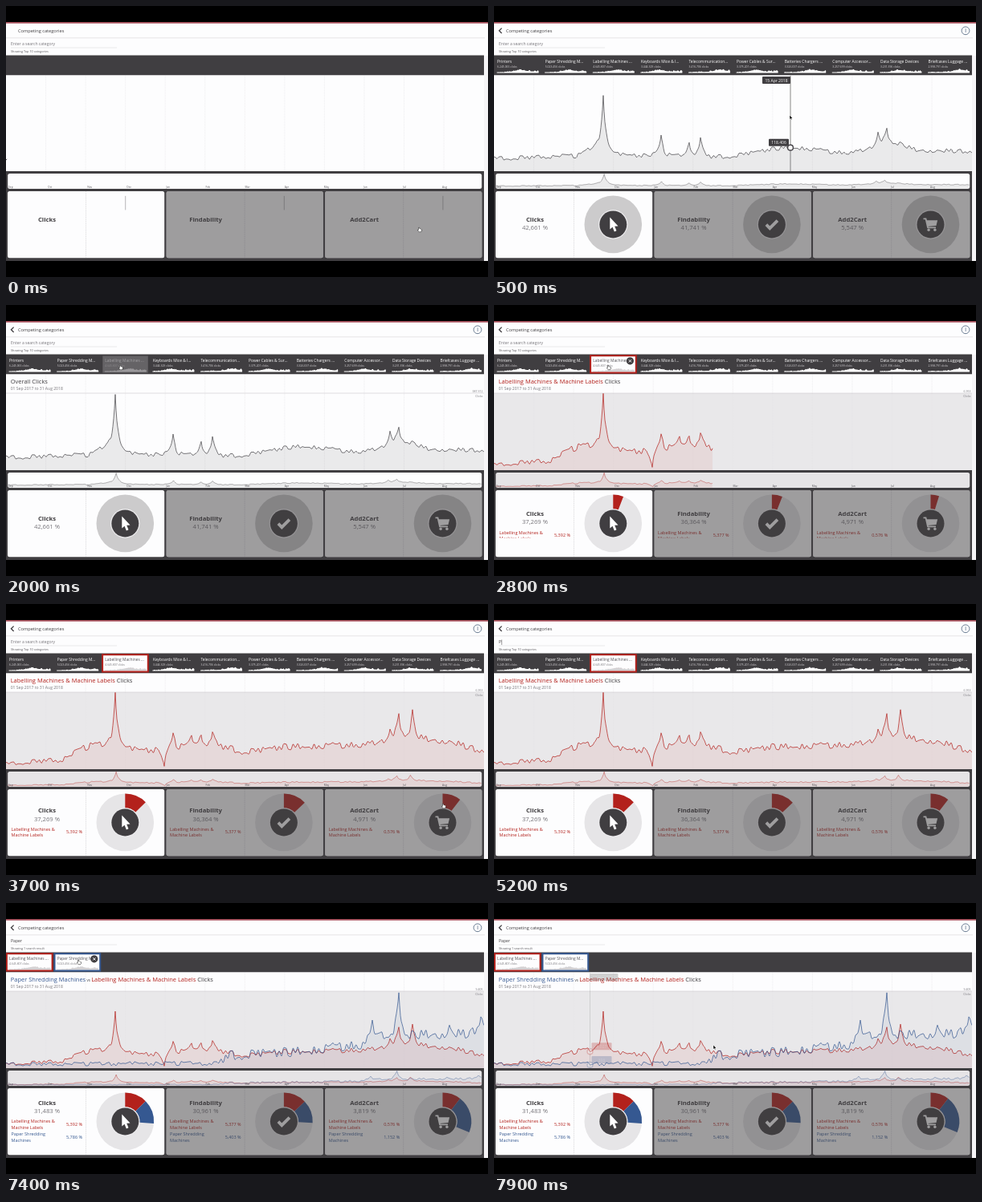
Animation of 600x338 px, one loop 8 s. Source, as an HTML page with a canvas:

```html
<!DOCTYPE html>
<html lang="en">
<head>
<meta charset="utf-8">
<title>Competing categories</title>
<style>
html, body { margin: 0; width: 100%; height: 100%; overflow: hidden; background: #000; }
canvas { display: block; width: 600px; height: 338px; }
</style>
</head>
<body>
<canvas id="stage"></canvas>
<script>
const LOOP = 8000, BASE = 206, TOP = 96, W = 595;
const DARK = '#403e41', WHITE = '#fdfdfe', RED = '#b3211c', BLUE = '#355891', GREY = '#77757a';
const canvas = document.getElementById('stage');
const c = canvas.getContext('2d');
const ratio = window.devicePixelRatio || 1;
canvas.width = 600 * ratio;
canvas.height = 338 * ratio;

const clamp = v => Math.max(0, Math.min(1, v));
const lerp = (a, b, k) => a + (b - a) * k;
const smooth = k => (1 - Math.cos(k * Math.PI)) / 2;
const ease = p => p < .5 ? 4 * p ** 3 : 1 - 4 * (1 - p) ** 3;
const grow = (t, start) => ease(clamp((t - start) / 445));

// Each series: trend points and spikes (x, height), plus rough noise
const overall = { total: 387312, color: '#454347', fill: 'rgba(64,62,65,.11)', rough: 2.6,
  trend: [0,16, 100,19, 128,30, 160,20, 280,18, 369,29.3484, 440,23, 500,35, 530,26, 596,25],
  spikes: [136,66, 208,24, 243,18, 257,24, 478,18, 489,18] };
const labels = { total: 6953, color: RED, fill: 'rgba(190,50,40,.09)', rough: 4,
  trend: [0,7, 60,11, 112,30, 135,30, 160,24, 260,29, 300,22, 350,28, 440,30, 500,40, 540,36, 596,24],
  spikes: [136,66, 197,-23, 208,17, 231,12, 243,15, 257,18, 478,14, 489,28, 506,32] };
const paper = { total: 9405, color: BLUE, fill: 'rgba(60,85,140,.07)', rough: 6,
  trend: [0,5, 260,6, 280,16, 345,20, 440,28, 465,42, 530,42, 575,43, 596,54],
  spikes: [456,16, 489,52, 552,10, 591,14] };

const jitter = i => Math.sin(i * i * 1.37 + i * 2.1);
function noise(x) {
  const u = (x - 369) / 2.9, i = Math.floor(u);
  return lerp(jitter(i), jitter(i + 1), smooth(u - i));
}
function height({ trend, spikes, rough }, x) {
  let i = 0;
  while (i < trend.length - 4 && trend[i + 2] < x) i += 2;
  let v = lerp(trend[i + 1], trend[i + 3], smooth(clamp((x - trend[i]) / (trend[i + 2] - trend[i]))));
  for (let s = 0; s < spikes.length; s += 2) v += spikes[s + 1] * Math.exp(-Math.abs(x - spikes[s]) / 3.2);
  return Math.max(0, v + noise(x) * rough * clamp(v / 14) * clamp((TOP - v) / 30));
}

function text(s, x, y, size, color = DARK, align = 'left', weight = 400) {
  c.font = `${weight} ${size}px "Open Sans", "Noto Sans", sans-serif`;
  c.fillStyle = color;
  c.textAlign = align;
  c.fillText(s, x, y);
  return x + c.measureText(s).width;
}
function box(x, y, w, h, color, r = 0) {
  c.fillStyle = color;
  c.beginPath();
  c.roundRect(x, y, w, h, r);
  c.fill();
}
function paint(color, width) {
  if (width) { c.strokeStyle = color; c.lineWidth = width; c.stroke(); }
  else { c.fillStyle = color; c.fill(); }
}
function path(points, color, width, close) {
  c.beginPath();
  for (let i = 0; i < points.length; i += 2) c.lineTo(points[i], points[i + 1]);
  if (close) c.closePath();
  paint(color, width);
}
function disc(x, y, r, color, width) {
  c.beginPath();
  c.arc(x, y, r, 0, 7);
  paint(color, width);
}
function dashed(points, dash, color) {
  c.setLineDash(dash);
  path(points, color, .6);
  c.setLineDash([]);
}

// Pointer moves: start, end, x, y
const moves = [[100,480,369,139], [600,900,222,76], [1200,1600,88,75], [1600,1950,143,78],
  [3500,3700,545,252], [3900,4400,60,47], [6250,6650,91,74], [7500,7850,274,180]];
function pointer(t) {
  let x = 515, y = 279;
  for (const [start, end, toX, toY] of moves) {
    const k = clamp((t - start) / (end - start));
    x = lerp(x, toX, k);
    y = lerp(y, toY, k);
  }
  return { x, y, inChart: y > 87 && y < BASE };
}
function drawPointer(t, p) {
  if (t > 4650 && t < 6250) return;
  const shape = p.inChart
    ? [-.8,-2.5, -.8,2, .3,1.1, 1,2.8, 1.7,2.4, 1,.9, 2.3,.7]
    : [-1.3,-2.6, -.4,-2.6, -.3,-.9, 2.2,-.4, 2.2,1, 1.6,2.6, -.9,2.6, -2.4,.4, -1.3,.6];
  c.save();
  c.translate(p.x, p.y);
  path(shape, p.inChart ? '#fff' : '#222', 1, true);
  path(shape, p.inChart ? '#111' : '#fff');
  c.restore();
}

const tiles = [['Printers', '6.245.065'], ['Paper Shredding M...', '5.023.456'], ['Labelling Machines ...', '4.645.807'],
  ['Keyboards Mice & I...', '3.444.329'], ['Telecommunication...', '3.416.706'], ['Power Cables & Sur...', '3.375.201'],
  ['Batteries Chargers ...', '3.326.037'], ['Computer Accessor...', '3.257.699'],
  ['Data Storage Devices', '3.231.396'], ['Briefcases Luggage ...', '2.998.791']];

function drawTile(n, slot, color, p) {
  const x = 1.6 + slot * 59.6;
  const hover = p.y > 62 && p.y < 86 && p.x > x && p.x < x + 57;
  const [ink, faint, sparkInk] = color ? ['#555358', GREY, '#d4d2d4']
    : hover ? ['#a3a1a4', '#8d8b8e', '#9b999c'] : ['#fff', '#d8d6d9', '#fff'];
  if (color || hover) box(x - .5, 63.5, 56.5, 21, color ? WHITE : '#656366');
  text(tiles[n][0], x + 2.5, 70.8, 4.9, ink);
  text(tiles[n][1] + ' clicks', x + 2.5, 76.6, 3.4, faint);
  const spark = [x + 2, 83.6];
  for (let i = 0; i <= 52; i++) {
    const swell = 2.2 * Math.exp(-(((i - 32 - 10 * jitter(n + 1)) / 9) ** 2));
    spark.push(x + 2 + i, 82.6 - i * .02 - swell - Math.max(0, jitter(i + n * 60)) * (.4 + i * .025));
  }
  path([...spark, x + 54, 83.6], sparkInk);
  if (!color) return;
  c.strokeStyle = color;
  c.lineWidth = 2;
  c.strokeRect(x - .7, 63.2, 56.7, 21.3);
  if (hover) {
    disc(x + 48.6, 69.8, 4.6, DARK);
    for (const d of [-1.6, 1.6]) path([x + 48.6 - d, 68.2, x + 48.6 + d, 71.4], '#fff', 1);
  }
}

function drawSeries(series, k, scale) {
  const end = Math.floor(W * k);
  const draw = (x0, base, sx, sy, width) => {
    const pts = [];
    for (let x = 0; x <= end; x++) pts.push(x0 + x * sx, base - height(series, x) * scale * sy);
    path([x0, base, ...pts, x0 + end * sx, base], series.fill);
    path(pts, series.color, width);
  };
  c.save();
  c.globalAlpha = .9;
  draw(0, BASE, 1, 1, .8);
  draw(2.5, 227.5, .99, .19, .45);
  c.restore();
}

function drawHover(x, alpha, shown, scales) {
  const label = (s, y, w, gap, color) => {
    const left = x > 300 ? x - w - gap : x + gap;
    box(left, y, w, 9, color, 1);
    text(s, left + w / 2, y + 6.6, 5, '#fff', 'center');
  };
  c.save();
  c.globalAlpha = alpha;
  path([x, 87, x, BASE], '#555', .7);
  const day = new Date(Date.UTC(2017, 8, 1 + Math.floor(x / W * 365)));
  const month = day.toLocaleString('en', { month: 'short', timeZone: 'UTC' });
  label(`${day.getUTCDate()} ${month} ${day.getUTCFullYear()}`, 88, 35, 0, DARK);
  shown.forEach((series, i) => {
    const v = height(series, x), y = BASE - v * scales[i];
    const value = Math.round(v / TOP * series.total).toLocaleString('de-DE');
    label(value, y - 11, 25, 2, series === overall ? DARK : series.color);
    disc(x, y, 3.4, WHITE);
    disc(x, y, 3.4, series.color, 1.4);
  });
  c.restore();
}

const cards = [
  { name: 'Clicks', all: 42661, parts: [5392, 5786] },
  { name: 'Findability', all: 41741, parts: [5377, 5403] },
  { name: 'Add2Cart', all: 5547, parts: [576, 1152] }];
const lines = [['Labelling Machines &', 'Machine Labels'], ['Paper Shredding', 'Machines']];
const percent = n => `${Math.floor(n / 1000)},${String(n % 1000).padStart(3, '0')} %`;

const icons = [
  () => path([-4,-9, -4,6, -.8,3.3, 1.6,9, 4.2,7.9, 1.9,2.4, 6.2,2.2], '#fff'),
  () => path([-7,.3, -2.6,4.8, 7,-4.8], '#fff', 3.8),
  () => {
    path([-9,-7, -6,-7, -3.5,4, 6.5,4], '#fff', 1.8);
    path([-5.2,-5.2, 8.6,-5.2, 7,1.6, -3.6,2.6], '#fff');
    for (const x of [-2.4, 5.4]) disc(x, 6.8, 1.7, '#fff');
  }];

function wedge(from, size, color) {
  const top = -Math.PI / 2;
  c.beginPath();
  c.arc(0, 0, 35.8, top + from, top + from + size);
  c.arc(0, 0, 18, top + from + size, top + from, true);
  paint(color);
}

function drawCard(i, ready, intro, ks) {
  const { name, all, parts } = cards[i];
  const count = ks.filter(k => k > 0).length;
  const rows = Math.sqrt(ks[0]) + Math.sqrt(ks[1]);
  const head = 268.8 - 8.5 * rows;
  c.save();
  c.translate(i * 197.6, 0);
  box(2, 231, 195.2, 83.2, WHITE, 2.5);
  dashed([99.5, 231, 99.5, 314], [1, .6], '#cfcdd0');

  text(name, 51, head, 7.7, DARK, 'center', 700);
  const rest = parts.slice(0, count).reduce((sum, n) => sum - n, all);
  if (ready) text(percent(rest), 51, head + 10.2, 7.7, GREY, 'center');
  c.save();
  c.beginPath();
  c.rect(2, head + 16, 97, 16 * rows + .6);
  c.clip();
  for (let n = 0; n < count; n++) {
    const color = [RED, BLUE][n], y = head + 22.6 + 16 * n;
    lines[n].forEach((s, row) => text(s, 6.5, y + row * 7.4, 5.5, color));
    text(percent(parts[n]), 95, y + 3.4, 5.5, color, 'right');
  }
  c.restore();

  c.save();
  c.translate(148.3, 272.4);
  const turn = Math.PI * 2;
  if (intro < .002) path([.4, -35.5, .4, -18], '#8a888b', .6);
  wedge(0, turn * intro, count ? '#e6e5e7' : '#cccbcc');
  let from = 0;
  for (let n = 0; n < count; n++) {
    const size = turn * parts[n] / all * ks[n];
    wedge(from, size, [RED, BLUE][n]);
    from += size;
  }
  if (ready) {
    disc(0, 0, 18.2, '#e9e8ea');
    disc(0, 0, 17, DARK);
    icons[i]();
  }
  c.restore();
  if (i) box(2, 231, 195.2, 83.2, 'rgba(64,62,65,.5)', 2.5);
  c.restore();
}

function drawHeader(t, ready, filtered) {
  box(0, 20, 600, 1.8, '#a8515c');
  box(0, 39.5, 596, .8, '#dddcde');
  text('Competing categories', 15, 33, 5.65);
  if (ready) {
    path([9.6, 27.6, 6.4, 30.8, 9.6, 34], DARK, 1.3);
    disc(587, 30.8, 4.9, '#5d7088', .9);
    text('i', 587, 33, 6.2, '#5d7088', 'center', 600);
  }
  const typed = 'Paper'.slice(0, t < 5100 ? 0 : 1 + Math.floor(clamp((t - 5100) / 950) * 4));
  let end = 6;
  if (typed) end = text(typed, 6, 49.3, 5.1);
  else text('Enter a search category', 6, 49.3, 5.05, GREY);
  if (t > 4700 && t < 6900) path([end + .6, 44.5, end + .6, 51], DARK, .5);
  box(6, 51.7, 132, .5, '#d3d1d4');
  text(filtered ? 'Showing 1 search result' : 'Showing Top 10 categories', 6, 58, 3.8, '#5a585c');
}

function drawTitle(one, two, total) {
  let x = 5.7;
  if (two) {
    x = text('Paper Shredding Machines', x, 98, 7.5, BLUE);
    x = text('vs', x + 1.4, 98, 4.5) + 1.2;
  }
  if (one) x = text('Labelling Machines & Machine Labels', x, 98, 7.5, RED) + 2;
  text(one ? 'Clicks' : 'Overall Clicks', x, 98, 7.5);
  text('01 Sep 2017 to 31 Aug 2018', 5.7, 105.6, 5.05, GREY);
  path([0, 110, W, 110], '#c9c8cb', .6);
  text(total.toLocaleString('de-DE'), 593.5, 108.5, 3.5, GREY, 'right');
  text('Clicks', 593.5, 115, 3.5, GREY, 'right');
}

function drawFrame(t) {
  const p = pointer(t);
  const intro = grow(t, 0), ks = [grow(t, 2585), grow(t, 6900)];
  const one = ks[0] > 0, two = ks[1] > 0, ready = t > 90;
  const filtered = t >= 6150, leaving = t > 7600;
  const hovering = p.inChart && (t < 850 || t > 4000 && t < 4300);
  const hoverAlpha = leaving ? clamp(1 - (t - 7750) / 200) : +hovering;
  const shown = two ? [labels, paper] : [one ? labels : overall];
  const scales = [lerp(1, labels.total / paper.total, ks[1]), 1];

  c.setTransform(ratio, 0, 0, ratio, 0, 0);
  box(0, 0, 600, 338, '#000');
  box(0, 20, 600, 298, WHITE);
  drawHeader(t, ready, filtered);

  box(0, 61.5, W, 24.8, DARK);
  if (filtered) {
    drawTile(2, 0, RED, p);
    drawTile(1, 1, two && BLUE, p);
  } else if (ready) {
    tiles.forEach((_, n) => drawTile(n, n, n === 2 && one && RED, p));
  }

  box(0, BASE, W, 112, DARK);
  box(2.2, 209, 590, 19, one ? '#e6e4e6' : WHITE, 2.5);
  if (one) box(0, 110, W, 96, '#e9e8ea');
  for (let n = 1; n < 12; n++) dashed([n * 49.55, 87, n * 49.55, BASE], [1, 1], '#e2e1e4');
  shown.forEach((series, i) => drawSeries(series, one ? ks[i] : intro, scales[i]));
  if (!ready) path([0, 192, 1.2, 191], DARK, 1);
  'Sep Oct Nov Dec Jan Feb Mar Apr May Jun Jul Aug'.split(' ')
    .forEach((m, n) => text(m, 3 + n * 49.1, 226.8, 3.3, '#555358'));

  if (t > 700 && hoverAlpha < .8) drawTitle(one, two, shown.at(-1).total);
  if (hoverAlpha) drawHover(leaving ? 119.5 : p.x, hoverAlpha, shown, scales);

  cards.forEach((_, i) => drawCard(i, ready, intro, ks));
  box(W, 62, 5, 256, '#f6f5f7');
  drawPointer(t, p);
}

const begin = performance.now();
function tick() {
  drawFrame((performance.now() - begin) % LOOP);
  requestAnimationFrame(tick);
}
tick();
</script>
</body>
</html>
```
